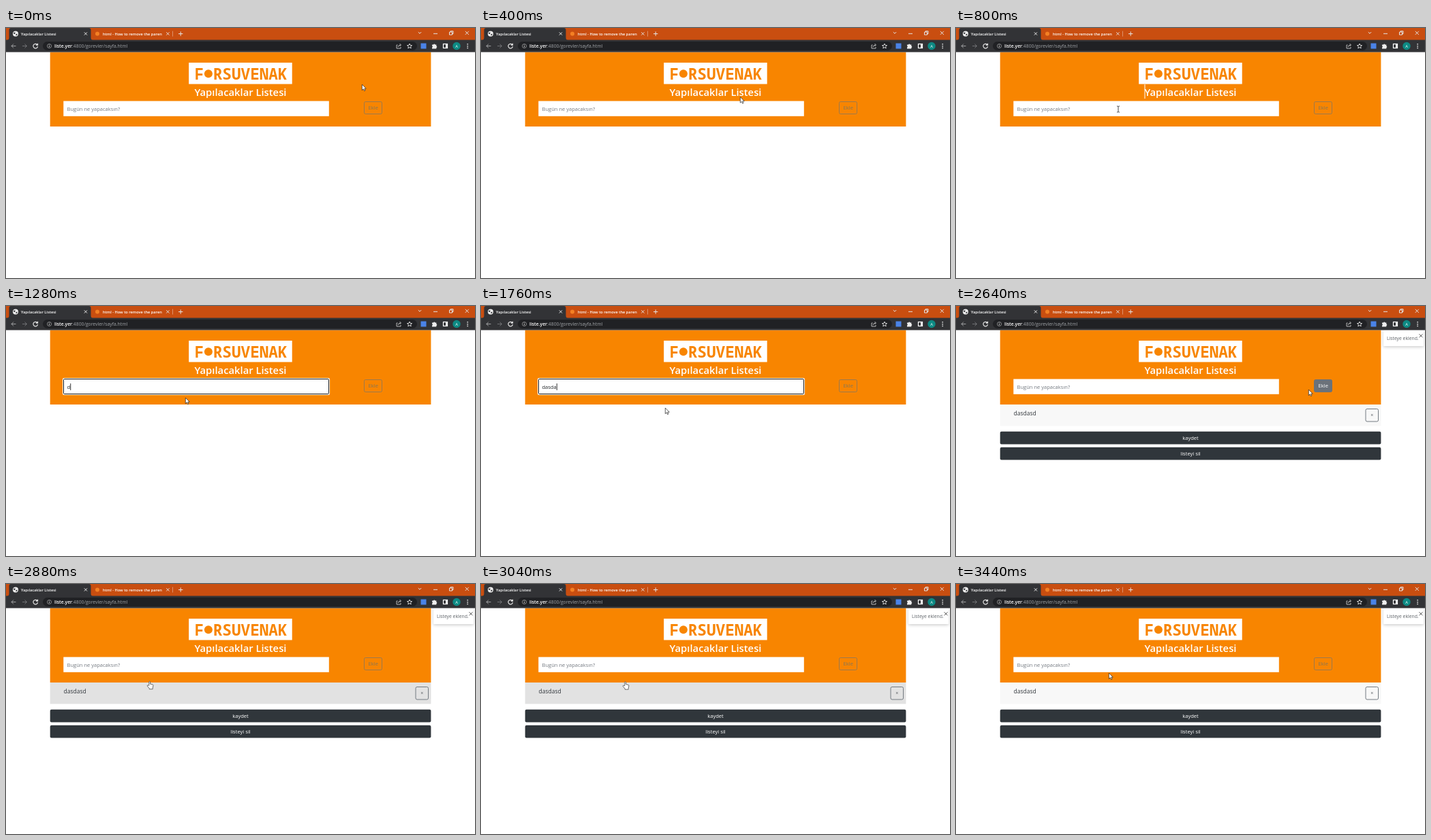
Write an HTML page that moves like this. It is 688 by 368 pixels and loops after 3.52 s.

```html
<!DOCTYPE html>
<html lang="tr">
<head>
<meta charset="utf-8">
<title>Yapılacaklar Listesi</title>
<style>
  html, body { margin: 0; width: 100%; height: 100%; overflow: hidden; background: #fff; }
  svg { display: block; width: 688px; height: 368px; font-family: "Open Sans", "Noto Sans", sans-serif; }
  text { white-space: pre; }
  .mid { text-anchor: middle; }
  .line { fill: none; stroke: #e4e4e4; stroke-width: 1; }
  .tab { font-size: 5.65px; font-weight: 600; fill: #fff; }
  .btn { font-size: 7.6px; fill: #fff; text-anchor: middle; }
  .brand { font: 600 22.7px "Noto Sans Mono", "DejaVu Sans Mono", monospace; fill: #f88500; }
</style>
</head>
<body>
<svg viewBox="0 0 688 368">
  <defs>
    <filter id="soft" x="-20%" y="-40%" width="140%" height="200%">
      <feDropShadow dx="0" dy="1.5" stdDeviation="2" flood-color="#000" flood-opacity=".2"/>
    </filter>
    <clipPath id="tabClip"><rect x="130" y="0" width="99" height="17"/></clipPath>
  </defs>
  <rect width="688" height="368" fill="#fff"/>

  <!-- page header -->
  <rect x="64.7" y="35.5" width="558.7" height="109.5" fill="#f88500"/>
  <rect x="268.2" y="51" width="151.5" height="31.5" fill="#fff"/>
  <text class="brand" x="276.5" y="75.6">F</text>
  <circle cx="296.9" cy="67.3" r="6" fill="#f88500"/>
  <text class="brand" x="303.7" y="75.6">RSUVENAK</text>
  <text class="mid" x="344" y="100.3" font-size="14.8" font-weight="600" fill="#fff">Yapılacaklar Listesi</text>
  <rect id="headCaret" x="276.5" y="83" width="1" height="21" fill="#fff"/>

  <!-- entry field -->
  <rect x="84.3" y="107.5" width="389.5" height="22.3" fill="#fff"/>
  <g id="focus">
    <rect x="83" y="106" width="392" height="25" rx="2" fill="#fff"/>
    <rect x="84.5" y="107.5" width="389" height="22" rx="1.2" fill="#fff" stroke="#151515"/>
  </g>
  <text id="hint" x="89.5" y="122" font-size="7.55" fill="#747a81">Bugün ne yapacaksın?</text>
  <text id="entry" x="89.5" y="122" font-size="7.5" fill="#212529"></text>
  <rect id="caret" y="114" width=".9" height="10" fill="#222"/>

  <rect id="addBox" x="525.5" y="108.5" width="26" height="18" rx="2" stroke-width="1"/>
  <text id="addText" class="btn" x="538.7" y="120.3">Ekle</text>

  <!-- list -->
  <g id="list">
    <rect id="row" x="64.7" y="145" width="558.7" height="31.5"/>
    <text x="84.5" y="161" font-size="8.5" fill="#33383d">dasdasd</text>
    <rect x="601" y="151.5" width="18.5" height="18.5" rx="2" fill="none" stroke="#737a81"/>
    <text class="mid" x="610.2" y="163.4" font-size="7" fill="#50565c">×</text>
    <rect x="64.7" y="184.8" width="558.7" height="18.6" rx="2" fill="#30363b"/>
    <text class="btn" x="344" y="197">kaydet</text>
    <rect x="64.7" y="208" width="558.7" height="18.6" rx="2" fill="#30363b"/>
    <text class="btn" x="344" y="220.2">listeyi sil</text>
    <rect x="627" y="34" width="59" height="25" rx="1.5" fill="#fff" filter="url(#soft)"/>
    <text x="632" y="50.3" font-size="6.8" fill="#5d6267">Listeye eklend.</text>
    <path d="M679.5 41.3l5 5m0-5l-5 5" class="line" style="stroke:#555"/>
  </g>

  <!-- browser frame -->
  <rect width="688" height="18" fill="#c94e10"/>
  <path d="M1 18Q4.5 18 4.5 14V3Q4.5 0 7.5 0H121.5Q124.5 0 124.5 3V14Q124.5 18 128 18Z" fill="#323336"/>
  <rect y="17.5" width="688" height="18" fill="#323336"/>
  <rect x="54" y="20" width="549" height="13" rx="6.5" fill="#202124"/>
  <circle cx="14" cy="8.5" r="4" fill="#f2f2f2"/>
  <path d="M11 6.5l3 .3-1 2-1.5.2zM14.5 9l2.3-.5-.7 2.3-1.6.3z" fill="#323336"/>
  <text class="tab" x="22" y="10.5">Yapılacaklar Listesi</text>
  <circle cx="134" cy="8.5" r="3" fill="#f48024"/>
  <text class="tab" x="142" y="10.5" clip-path="url(#tabClip)">html - How to remove the parent</text>
  <path class="line" d="M114.8 6.3l4.2 4.2m0-4.2l-4.2 4.2M235.3 6.3l4.2 4.2m0-4.2l-4.2 4.2M253 8.5h6.4m-3.2-3.2v6.4"/>
  <path d="M244.5 4.5v8" stroke="#e3a283" stroke-width=".8"/>
  <path class="line" d="M604.8 6l2.2 2.2L609.2 6M627 8.3h6M673.8 4.8l5 5m0-5l-5 5"/>
  <path class="line" d="M650.5 6h4v4h-4zM652 6V4.6h4v4h-1.3" stroke-width=".8"/>

  <path class="line" style="stroke:#a0a1a3" d="M14.5 26.5H8m3-3l-3 3 3 3"/>
  <path class="line" style="stroke:#707174" d="M24 26.5h6.5m-3-3l3 3-3 3"/>
  <path class="line" d="M45.8 24.5a3.3 3.3 0 1 0 .7 2.6M46.5 22.8v2.4h-2.6" style="stroke-width:1.2"/>
  <circle class="line" cx="63.5" cy="26.5" r="3" style="stroke:#aaa;stroke-width:.8"/>
  <path class="line" style="stroke:#bbb" d="M63.5 26v2.2m0-3.7v.8"/>
  <text x="71" y="28.9" font-size="6.8" fill="#a2a5a9"><tspan fill="#fff" font-weight="600">liste.yer</tspan>:4800/gorevler/sayfa.html</text>
  <path class="line" style="stroke:#b8b8b8" d="M574.5 25h-1.5v5h6v-2M575 28q.5-3 4-3m-1.5-2l2 2-2 2"/>
  <path class="line" style="stroke-width:.9" d="M592 23l1 2.4 2.6.2-2 1.7.6 2.6-2.2-1.4-2.2 1.4.6-2.6-2-1.7 2.6-.2z"/>
  <rect x="608.5" y="22.5" width="8" height="8" fill="#4a83e8"/>
  <path d="M625 24.5h2a1.3 1.3 0 0 1 2.5 0h1.8v2a1.3 1.3 0 0 1 0 2.5v1.5H625v-2a1.2 1.2 0 0 0 0-2.3z" fill="#eee"/>
  <rect x="641.5" y="23.5" width="6" height="6" fill="none" stroke="#fff" stroke-width="1.2"/>
  <rect x="645" y="23.5" width="2.5" height="6" fill="#fff"/>
  <circle cx="661" cy="26.5" r="5.7" fill="#0d8a84"/>
  <text class="mid" x="661" y="28.7" font-size="5.8" fill="#fff">A</text>
  <path d="M676.4 23h1.5v1.5h-1.5zm0 2.9h1.5v1.5h-1.5zm0 2.9h1.5v1.5h-1.5z" fill="#e8e8e8"/>

  <!-- pointers -->
  <g id="pointer">
    <path id="arrow" d="M.3 0V8.6L2.3 6.8 3.6 9.6 5 9 3.7 6.2H6.3Z" fill="#fff" stroke="#222" stroke-width=".7"/>
    <path id="beam" d="M-2-4.5Q0-4.5 0-3.7Q0-4.5 2-4.5M0-3.7V3.7M-2 4.5Q0 4.5 0 3.7Q0 4.5 2 4.5" fill="none" stroke="#333" stroke-width=".9"/>
    <path id="hand" d="M-1.2 3.5V-2Q-.3-3.4 .6-2V1.2L4 1.9Q5 2.2 4.9 3.5L4.2 7.2V8.7H-.8V7.6L-3.7 4.2Q-4 2.6-2.4 3Z" fill="#fff" stroke="#333" stroke-width=".7"/>
  </g>
</svg>
<script>
const LOOP = 3520, STEP = 80;
const WORD = "dasdasd", TYPE_AT = 1280, KEY_GAP = 100;
const FOCUS_AT = 1040, ADD_AT = 2480;

// time, x, y
const path = [
  [0, 522, 83], [160, 520, 85], [640, 240, 118], [800, 238, 119.5], [960, 238, 119.5],
  [1120, 250, 126], [1280, 263, 135], [1520, 270, 150], [1800, 270, 150],
  [2240, 518, 114], [2320, 523, 113], [2480, 531, 116], [2560, 528, 119],
  [2640, 517, 123], [2880, 211, 146], [3200, 213, 147], [3280, 215, 141],
  [3360, 218, 137], [3440, 224, 131]
];

const $ = id => document.getElementById(id);
const show = (id, on) => $(id).style.display = on ? "" : "none";
const fill = (id, color) => $(id).setAttribute("fill", color);
const inside = ([x, y], l, t, r, b) => x >= l && x <= r && y >= t && y <= b;

function pointerAt(t) {
  const i = path.findIndex(k => k[0] > t);
  if (i < 0) return path[path.length - 1].slice(1);
  const [t0, x0, y0] = path[i - 1], [t1, x1, y1] = path[i];
  const u = (t - t0) / (t1 - t0), e = u * u * (3 - 2 * u);
  return [x0 + (x1 - x0) * e, y0 + (y1 - y0) * e];
}

function draw(t) {
  const added = t >= ADD_AT;
  const focused = t >= FOCUS_AT && !added;
  const keys = Math.max(0, Math.floor((t - TYPE_AT) / KEY_GAP) + 1);
  const typed = focused ? WORD.slice(0, keys) : "";

  show("headCaret", t >= 640 && t < FOCUS_AT);
  show("focus", focused);
  show("hint", !typed);
  $("entry").textContent = typed;
  show("caret", focused && t < 2280);
  $("caret").setAttribute("x", 89.7 + (typed ? $("entry").getComputedTextLength() : 0));

  const p = pointerAt(t);
  const onInput = inside(p, 84, 108, 474, 130);
  const onButton = inside(p, 525, 108, 552, 127);
  const onRow = added && inside(p, 65, 145, 623, 176);

  const lit = onButton || (t >= ADD_AT && t < 2720);
  fill("addBox", lit ? "#6b727a" : "none");
  $("addBox").setAttribute("stroke", lit ? "#6b727a" : "#9c7a4f");
  $("addText").style.fill = lit ? "#fff" : "#84765a";

  show("list", added);
  fill("row", onRow ? "#e2e2e2" : "#f8f8f8");

  show("beam", onInput);
  show("hand", onButton || onRow);
  show("arrow", !onInput && !onButton && !onRow);
  $("pointer").setAttribute("transform", `translate(${p})`);
}

const start = performance.now();
function tick() {
  const t = (performance.now() - start) % LOOP;
  draw(Math.floor(t / STEP) * STEP);
  requestAnimationFrame(tick);
}
tick();
</script>
</body>
</html>
```
